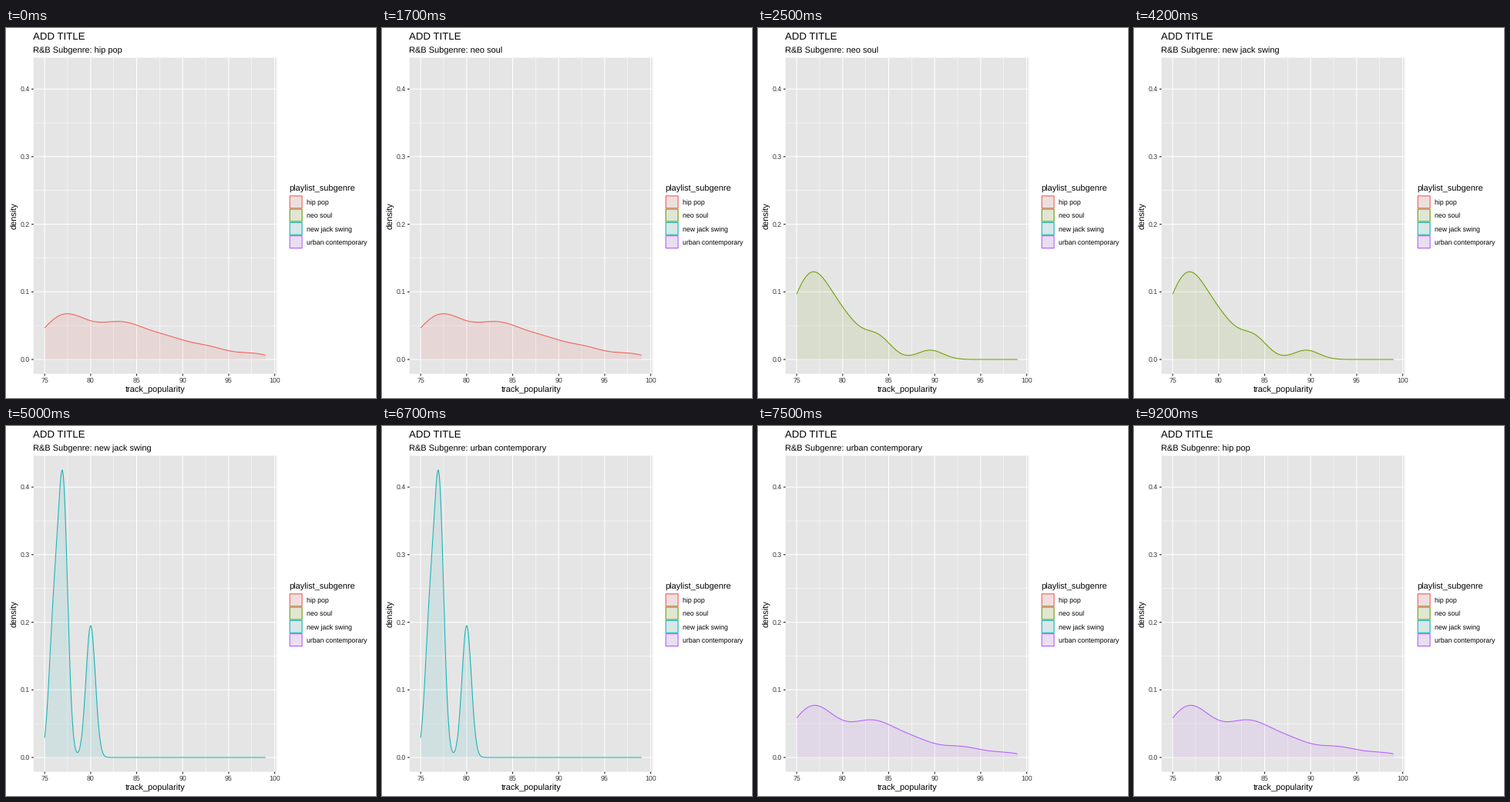
A matplotlib script for the animation above (10000 ms loop, 480 by 480 pixels).

```python
import numpy as np
import matplotlib.pyplot as plt
from matplotlib.animation import FuncAnimation
from matplotlib.colors import to_rgba
from matplotlib.patches import Rectangle

plt.rcParams["font.family"] = "Liberation Sans"
plt.rcParams["text.hinting"] = "none"

SIZE, DPI = 480, 72
STEP, PERIOD, LEAD = 100, 2500, 800  # the subtitle changes LEAD ms before the curve

LEFT, RIGHT, TOP, BOTTOM = 35.8, 351.0, 38.6, 448.6
ZERO_Y, UNIT_Y = 430.0, 877.0
UNIT_X = (RIGHT - LEFT) / 26.4
KEY = 17.28

# name, colour, bumps of the density as (center, height, width)
GENRES = [
    ("hip pop", "#F35E5A",
     [(77, 0.0623, 2.55), (83.4, 0.052, 2.9), (88.6, 0.0216, 2.2),
      (92.8, 0.0165, 2.2), (97.7, 0.008, 1.8)]),
    ("neo soul", "#6B9F00",
     [(76.7, 0.1275, 2.28), (80.6, 0.034, 1.65), (83.8, 0.032, 1.5),
      (89.5, 0.0138, 1.4)]),
    ("new jack swing", "#17B3B7",
     [(76, 0.198, 0.51), (77, 0.391, 0.51), (80, 0.195, 0.51)]),
    ("urban contemporary", "#B65EFF",
     [(76.75, 0.0745, 2.46), (83.2, 0.0515, 2.6), (88, 0.02, 2.2),
      (93, 0.0148, 2.2), (97.8, 0.0063, 1.8)]),
]


def to_x(value):
    return LEFT + (value - 73.8) * UNIT_X


def to_y(density):
    return ZERO_Y - density * UNIT_Y


def density(x, bumps):
    return sum(h * np.exp(-0.5 * ((x - c) / w) ** 2) for c, h, w in bumps)


fig = plt.figure(figsize=(SIZE / DPI, SIZE / DPI), dpi=DPI, facecolor="white")
ax = fig.add_axes([0, 0, 1, 1])
ax.set_xlim(0, SIZE)
ax.set_ylim(SIZE, 0)
ax.axis("off")


def box(x, y, w, h, z, **style):
    ax.add_patch(Rectangle((x, y), w, h, zorder=z, snap=False, **style))


def line(x, y, color, width, z):
    return ax.plot(x, y, color=color, lw=width, zorder=z, snap=False,
                   solid_capstyle="butt", solid_joinstyle="round")[0]


def label(x, y, text, size, color="black", **style):
    return ax.text(x, y, text, fontsize=size, color=color, va="baseline",
                   zorder=6, **style)


# Panel, grid and axes
box(LEFT, TOP, RIGHT - LEFT, BOTTOM - TOP, 0, fc="#E5E5E5", ec="none")
for v in np.arange(77.5, 100, 5):
    line([to_x(v)] * 2, [TOP, BOTTOM], "white", 0.53, 1)
for d in np.arange(0.05, 0.4, 0.1):
    line([LEFT, RIGHT], [to_y(d)] * 2, "white", 0.53, 1)
for v in range(75, 101, 5):
    x = to_x(v)
    line([x, x], [TOP, BOTTOM], "white", 1.07, 2)
    line([x, x], [BOTTOM, BOTTOM + 2.75], "#1F1F1F", 1.07, 2)
    label(x, 460, str(v), 8.8, "#353535", ha="center")
for k in range(5):
    y = to_y(k / 10)
    line([LEFT, RIGHT], [y, y], "white", 1.07, 2)
    line([LEFT - 2.75, LEFT], [y, y], "#1F1F1F", 1.07, 2)
    label(31, y + 3.1, f"{k / 10:.1f}", 8.8, "#353535", ha="right")

label(35, 15, "ADD TITLE", 13.2)
subtitle = label(35, 33, "", 11)
label((LEFT + RIGHT) / 2, 473, "track_popularity", 11, ha="center")
label(14, (TOP + BOTTOM) / 2, "density", 11, ha="center", rotation=90,
      rotation_mode="anchor")
label(367, 212, "playlist_subgenre", 11)

# Legend keys and density curves
values = np.linspace(75, 99, 512)
xs = to_x(values)
curves = []
for k, (name, color, bumps) in enumerate(GENRES):
    y = 217.1 + k * KEY
    box(367.5, y, KEY, KEY, 1, fc="#EEEEEE", ec="none")
    box(368.2, y + 0.7, KEY - 1.4, KEY - 1.4, 2,
        fc=to_rgba(color, 0.1), ec=color, lw=1.07)
    label(390, y + 12, name, 8.8)

    ys = to_y(density(values, bumps))
    area = ax.fill_between(xs, ys, ZERO_Y, color=color, alpha=0.1, lw=0, zorder=3)
    curves.append((area, line(xs, ys, color, 1.07, 4)))


def draw(frame):
    now = frame * STEP
    shown = now // PERIOD
    named = (now + LEAD) // PERIOD % len(GENRES)
    subtitle.set_text("R&B Subgenre: " + GENRES[named][0])
    for k, parts in enumerate(curves):
        for part in parts:
            part.set_visible(k == shown)
    return []


anim = FuncAnimation(fig, draw, frames=len(GENRES) * PERIOD // STEP,
                     interval=STEP, repeat=True, repeat_delay=0, blit=False)
plt.show()
```
